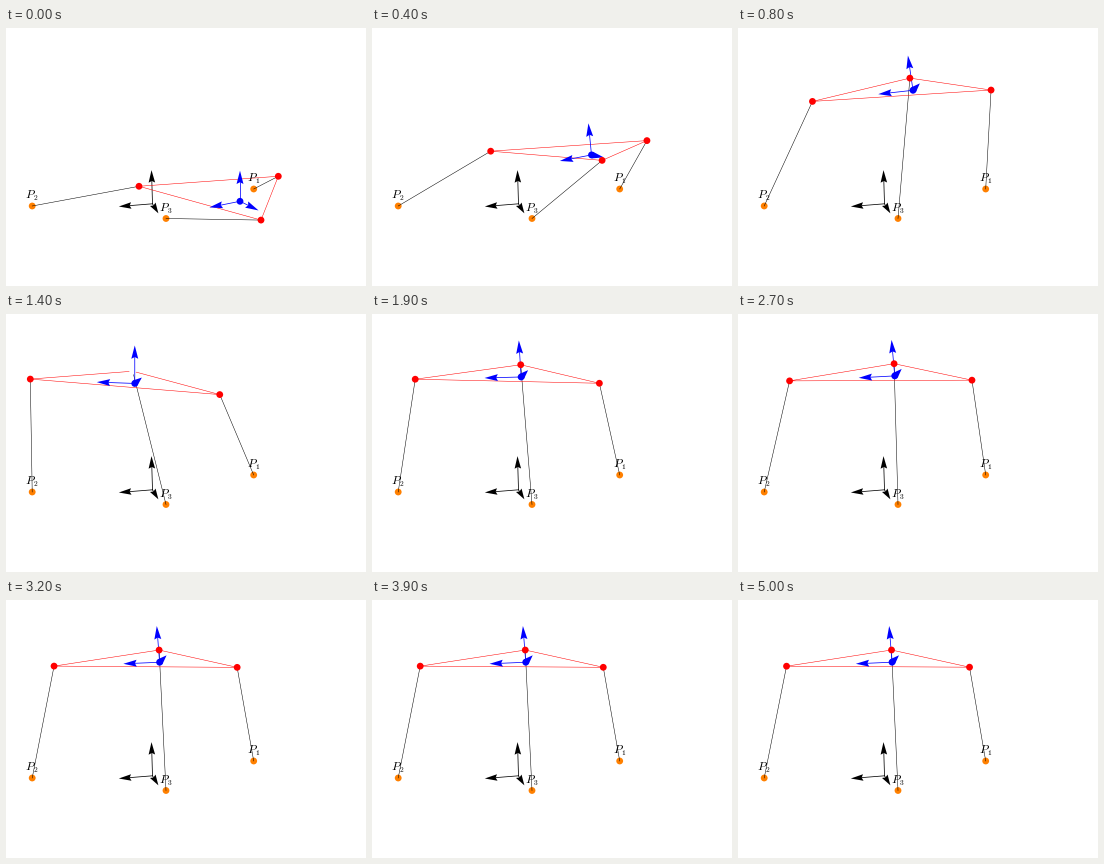
Animation, 360 px wide and 258 px high, one loop 5100 ms. Source, as a matplotlib script:

```python
import numpy as np
import matplotlib.pyplot as plt
from matplotlib.animation import FuncAnimation
from matplotlib.patches import Circle, Polygon

plt.rcParams["mathtext.fontset"] = "cm"

W, H, DPI = 360, 258, 100
FRAMES, STEP = 51, 100
PX = 72 / DPI
DOT = 3.4
ORANGE, RED, BLUE, BLACK = "#ff8000", "#ff0000", "#0000ff", "#000000"

VANISH = np.array([106, 110])      # where lines along the x axis meet
ORIGIN = np.array([146.5, 175.8])  # fixed frame
REST = np.array([154, 62.2])       # platform centre when settled
FEET = np.array([(26.2, 178), (247.7, 161), (160, 190.5)])

# Platform corners seen from its centre, lying down and settled.
LYING = np.array([(-101, -15), (38.3, -25), (21, 18.8)])
UPRIGHT = np.array([(-105.5, 4), (77.5, 5), (-0.5, -12.2)])
SPREAD = np.array([0.11, -0.12, -0.04])
BOW = np.array([0.006, 0.007, -0.004])

START, UP, FAR = 80, 21, -25.6     # sway at the start, once risen, at the far end
UP_TIME, FAR_TIME, UP_SPEED = 0.8, 1.35, -150
DECAY, FREQ = 1.7, 3.0
HIDE_BELOW = -25.2                 # the third corner vanishes at the far end


def hermite(p0, p1, v0, v1, span, u):
    return ((1 - 3 * u**2 + 2 * u**3) * p0 + (3 * u**2 - 2 * u**3) * p1
            + span * (u * (1 - u)**2 * v0 - u**2 * (1 - u) * v1))


def sway_at(t):
    """Sideways offset: rise from rest, swing past, then ring down to zero."""
    if t < UP_TIME:
        return hermite(START, UP, 0, UP_SPEED, UP_TIME, t / UP_TIME)
    if t < FAR_TIME:
        span = FAR_TIME - UP_TIME
        return hermite(UP, FAR, UP_SPEED, 0, span, (t - UP_TIME) / span)
    d = t - FAR_TIME
    wave = np.cos(FREQ * d) + DECAY / FREQ * np.sin(FREQ * d)
    return FAR * np.exp(-DECAY * d) * wave


def axis_tips(origin, unit, tilt, lean, turn=0):
    """Screen ends of the z, y and x axes of a frame."""
    z = origin + unit * np.array([-lean, -1])
    y = origin + unit * np.array([-1, tilt])
    x = origin + 0.145 * (origin - VANISH) - np.array([turn, 0])
    return z, y, x


def pose(s):
    """Centre, corners and axis tips of the platform for a sway."""
    drop = (max(s - UP, 0) / (START - UP))**2
    lift = 1 - drop
    center = REST + np.array([s, -0.128 * s + 0.0063 * s**2 + 81 * drop])

    swing = min(s, UP)
    roll = 0.17 * np.tanh(swing / 50)
    corners = LYING * drop + UPRIGHT * lift
    corners[:, 0] += lift * (SPREAD * swing + BOW * swing**2)
    corners[:, 1] -= lift * roll * UPRIGHT[:, 0]

    tilt = 0.044 + 0.17 * np.tanh(s / 50)
    tips = axis_tips(center, 36.2 - 0.07 * s, tilt,
                     (tilt + 0.035) * lift, 0.15 * s * lift)
    return center, center + corners, tips


fig = plt.figure(figsize=(W / DPI, H / DPI), dpi=DPI, facecolor="white")
ax = fig.add_axes([0, 0, 1, 1])
ax.set_xlim(0, W)
ax.set_ylim(H, 0)
ax.axis("off")


def line(color, z, width=0.5):
    return ax.plot([], [], color=color, lw=width * PX, zorder=z)[0]


def dot(xy, color, z):
    return ax.add_patch(Circle(xy, DOT, fc=color, lw=0, zorder=z))


class Arrow:
    def __init__(self, color, z, size):
        self.size = size
        self.shaft = line(color, z, 0.75)
        self.head = ax.add_patch(
            Polygon(np.zeros((4, 2)), fc=color, lw=0, zorder=z))

    def place(self, start, tip):
        length = np.hypot(*(tip - start))
        along = (tip - start) / length
        side = np.array([-along[1], along[0]]) * 0.26 * self.size
        size = min(self.size, 0.95 * length)
        back = tip - along * size
        notch = tip - along * size * 0.87
        self.shaft.set_data(*zip(start, notch))
        self.head.set_xy([tip, back + side, notch, back - side])


def label(x, y, n):
    for dx, dy, text, size in [(0, 0, "P", 8.6), (8, 1.8, n, 5.4)]:
        ax.text(x + dx, y + dy, f"${text}$", fontsize=size, color=BLACK,
                va="baseline", zorder=6)


for foot, n in zip(FEET, (2, 1, 3)):
    dot(foot, ORANGE, 1)
    label(foot[0] - 6.8, foot[1] - 7.7, n)
for tip in axis_tips(ORIGIN, 33.7, 0.08, 0.03):
    Arrow(BLACK, 2, 12.5).place(ORIGIN, tip)

legs = [line(BLACK, 3) for _ in FEET]
edges = line(RED, 3)
dots = [dot((0, 0), RED, 5) for _ in FEET]
axes = [Arrow(BLUE, 4, 13.3) for _ in range(3)]
hub = dot((0, 0), BLUE, 4)


def update(k):
    s = sway_at(k * STEP / 1000)
    center, corners, tips = pose(s)
    for leg, foot, mark, corner in zip(legs, FEET, dots, corners):
        leg.set_data(*zip(foot, corner))
        mark.center = corner
    edges.set_data(*corners[[0, 1, 2, 0]].T)
    hidden = s < HIDE_BELOW
    dots[2].set_facecolor("white" if hidden else RED)
    dots[2].set_zorder(3.5 if hidden else 5)
    hub.center = center
    for arrow, tip in zip(axes, tips):
        arrow.place(center, tip)
    return []


anim = FuncAnimation(fig, update, frames=FRAMES, interval=STEP,
                     repeat=True, repeat_delay=0, blit=False)
plt.show()
```
